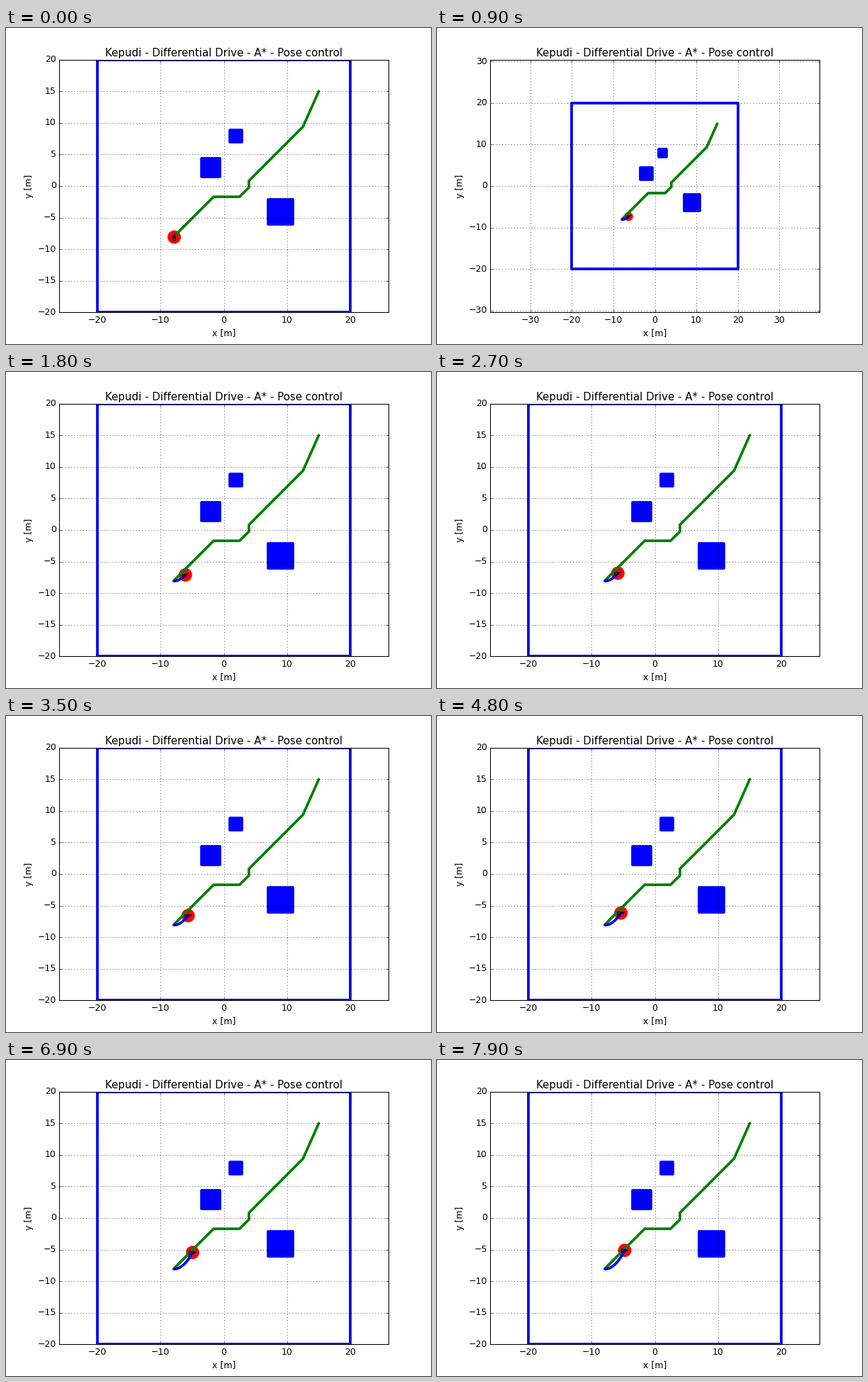
These frames come from a looping animation (600 px wide and 446 px high, 8 s). A matplotlib script:

```python
import numpy as np
import matplotlib.pyplot as plt
from matplotlib.animation import FuncAnimation
from matplotlib.patches import Circle, Rectangle

FRAMES, STEP = 80, 100
W, H, DPI = 600, 446, 75
DOT = 3.6                      # stroke width, pt
WALL = 20                      # half side of the arena, m
SPEED = 0.39                   # m/s
ZOOM_OUT, ZOOM_IN = 0.5, 1.7   # s

plt.rcParams.update({
    "font.family": "DejaVu Sans",
    "font.size": 12,
    "axes.titlesize": "large",
    "axes.titlepad": 4,
    "axes.labelpad": 5,
    "axes.linewidth": 1,
    "axes.axisbelow": False,
    "ytick.alignment": "center",
    "lines.dotted_pattern": [1, 3],
    "lines.scale_dashes": False,
})

fig = plt.figure(figsize=(W / DPI, H / DPI), dpi=DPI, facecolor="white")
ax = fig.add_axes([0.125, 0.1, 0.775, 0.8])
ax.set_title("Kepudi - Differential Drive - A* - Pose control")
ax.set_xlabel("x [m]")
ax.set_ylabel("y [m]")
ax.tick_params(direction="in", top=True, right=True, length=4, width=0.5, pad=4)
ax.grid(True, color="black", linestyle=":", linewidth=0.6)


def stroke(color, x=(), y=()):
    return ax.plot(x, y, color=color, lw=DOT, solid_capstyle="round",
                   solid_joinstyle="round")[0]


def square(x, y, side, grid=0.0):
    # The far edges stop one grid cell short
    ax.add_patch(Rectangle((x - side / 2, y - side / 2), side - grid,
                           side - grid, fc="blue" if grid else "none",
                           ec="blue", lw=DOT, joinstyle="round", zorder=2))


def follow(x, y, heading, ds):
    """Points reached by stepping ds along each heading (radians)."""
    return (x + np.cumsum(np.r_[0, ds * np.cos(heading)]),
            y + np.cumsum(np.r_[0, ds * np.sin(heading)]))


square(0, 0, 2 * WALL)
for x, y, side in ((9, -4, 4), (-2, 3, 3), (2, 8, 2)):
    square(x, y, side, 0.1)

# Planned route: turns in degrees, leg lengths in metres
stroke("green", *follow(-7.9, -8, np.radians([45, 0, 45, 90, 45, 66]),
                        np.array([8.9, 4.1, 2.1, 1.05, 12.1, 6.15])))

body = ax.add_patch(Circle((0, 0), 1.03, color="red", lw=0.5))
trail = stroke("blue")
arrow, = ax.plot([], [], color="black", lw=1)


def heading(s):
    """The robot steers from level towards the route's direction."""
    return np.radians(68) * (1 - np.exp(-s / 1.8))


def set_view(scale, ystep):
    rx, ry = W * 0.775 / 2 / scale, H * 0.8 / 2 / scale
    for axis, reach, step in ((ax.xaxis, rx, 10), (ax.yaxis, ry, ystep)):
        n = int(reach / step + 1e-9)
        axis.set_ticks(step * np.arange(-n, n + 1))
    ax.set(xlim=(-rx, rx), ylim=(-ry, ry))


def update(i):
    t = i * STEP / 1000
    if ZOOM_OUT <= t < ZOOM_IN:
        set_view(5.86, 10)
    else:
        set_view(H * 0.8 / (2 * WALL), 5)

    s = SPEED * t + (0.05 if t < ZOOM_OUT else 1.43)
    n = 100
    mid = (np.arange(n) + 0.5) * s / n
    x, y = follow(-7.9, -8.08, heading(mid), s / n)
    trail.set_data(x, y)
    body.center = x[-1], y[-1]

    a = np.pi / 2 - 1.4 * heading(s)
    tri = np.array([0.5, -0.5 + 0.25j, -0.5 - 0.25j, 0.5]) * np.exp(1j * a)
    arrow.set_data(x[-1] + tri.real, y[-1] + tri.imag)
    return body, trail, arrow


anim = FuncAnimation(fig, update, frames=FRAMES, interval=STEP,
                     init_func=lambda: update(0), repeat=True, repeat_delay=0)
plt.show()
```
